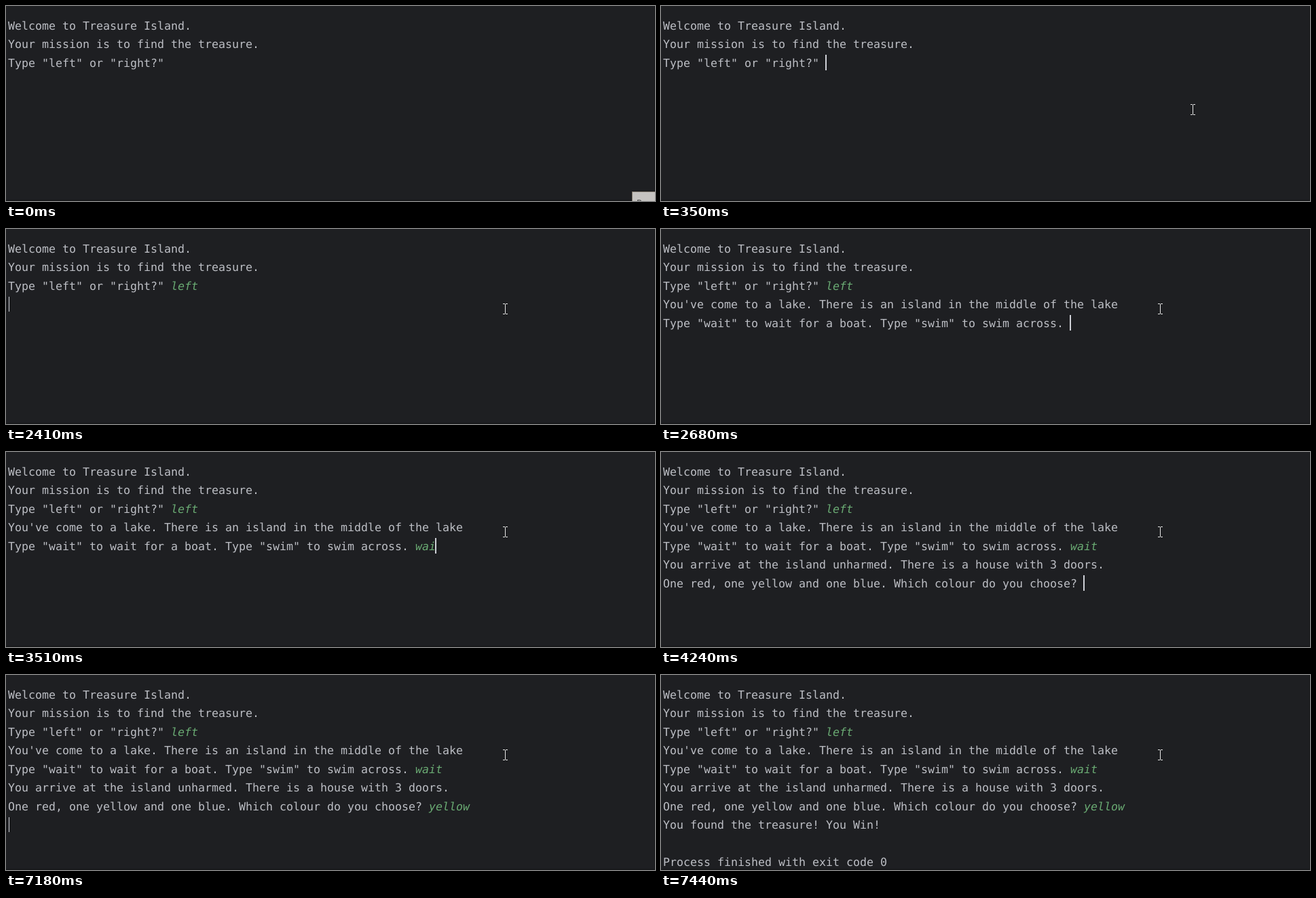
An HTML page for the animation above (8000 ms loop, 956 px wide and 288 px high).

```html
<!DOCTYPE html>
<html lang="en">
<head>
<meta charset="utf-8">
<title>Console game</title>
<style>
  html, body { margin: 0; width: 100%; height: 100%; overflow: hidden; background: #1e1f22; }
  svg { display: block; width: 956px; height: 288px; }
  text {
    font: 16.61px "DejaVu Sans Mono", "Noto Sans Mono", monospace;
    fill: #bcbec4;
    text-rendering: geometricPrecision;
    white-space: pre;
  }
  .typed { font-style: italic; fill: #6aab73; }
  #tip text { font: 12px Inter, sans-serif; fill: #3c3c3c; }
</style>
</head>
<body>
<svg viewBox="0 0 956 288" shape-rendering="crispEdges">
  <rect width="956" height="288" fill="#1e1f22"/>
  <g id="console"></g>
  <rect id="caret" width="2" fill="#ced0d6"/>
  <rect x="955" width="1" height="288" fill="#18191b"/>
  <rect y="286" width="956" height="2" fill="#18191b"/>
  <g id="tip">
    <rect x="922" y="274" width="34" height="14" fill="#8b8378"/>
    <rect x="923" y="275" width="33" height="13" fill="#c5c3c1"/>
    <text x="929" y="295">Run</text>
  </g>
  <path id="mouse" fill="none" stroke="#e8e8e8" d="M-3 -7.5H0M1 -7.5H4M.5 -7V7M-3 7.5H0M1 7.5H4"/>
</svg>
<script>
const LOOP = 8000, LEFT = 3, CELL = 10, PITCH = 27.5;
const $ = id => document.getElementById(id);

// [row, time shown, text]
const lines = [
  [0, 0, 'Welcome to Treasure Island.'],
  [1, 0, 'Your mission is to find the treasure.'],
  [2, 0, 'Type "left" or "right?"'],
  [3, 2680, "You've come to a lake. There is an island in the middle of the lake"],
  [4, 2680, 'Type "wait" to wait for a boat. Type "swim" to swim across.'],
  [5, 4240, 'You arrive at the island unharmed. There is a house with 3 doors.'],
  [6, 4240, 'One red, one yellow and one blue. Which colour do you choose?'],
  [7, 7440, 'You found the treasure! You Win!'],
  [9, 7440, 'Process finished with exit code 0']
];

// ready: caret shown, keys: key times, enter: new line, reply: next output
const answers = [
  { row: 2, col: 24, word: 'left', ready: 70, keys: [1270, 1470, 1670, 1870], enter: 2410, reply: 2680 },
  { row: 4, col: 60, word: 'wait', ready: 2680, keys: [3110, 3310, 3510, 3780], enter: 4040, reply: 4240 },
  { row: 6, col: 62, word: 'yellow', ready: 4240, keys: [5370, 5570, 6080, 6180, 6450, 6580], enter: 7180, reply: 7440 }
];
const blinkOff = [5040, 5370];

function addText(row, col, str, cls = '') {
  const el = document.createElementNS('http://www.w3.org/2000/svg', 'text');
  el.setAttribute('x', LEFT + col * CELL);
  el.setAttribute('y', Math.floor(35 + row * PITCH));
  el.setAttribute('class', cls);
  el.textContent = str;
  $('console').append(el);
  return el;
}

const show = (el, on) => el.setAttribute('visibility', on ? 'visible' : 'hidden');

function placeCaret(row, col) {
  const top = 17 + row * PITCH, half = top % 1;
  const caret = $('caret');
  caret.setAttribute('x', col ? LEFT - 1 + col * CELL : 4);
  caret.setAttribute('width', col ? 2 : 1);
  caret.setAttribute('y', Math.ceil(top));
  caret.setAttribute('height', half ? 22 : 23);
}

function placeMouse(t) {
  const step = Math.min(6, Math.floor((t - 70) / 80));
  const left = (1 - step / 6) ** 2;
  const x = Math.round(735 + 190 * left), y = Math.round(118 + 140 * left);
  $('mouse').setAttribute('transform', `translate(${x} ${y})`);
  show($('mouse'), t >= 70);
}

const output = lines.map(([row, at, str]) => ({ at, el: addText(row, 0, str) }));
for (const a of answers) a.el = addText(a.row, a.col, '', 'typed');

function draw(t) {
  for (const { at, el } of output) show(el, t >= at);
  let caretOn = false;
  for (const a of answers) {
    const n = a.keys.filter(k => t >= k).length;
    a.el.textContent = a.word.slice(0, n);
    if (t < a.ready || t >= a.reply) continue;
    caretOn = t < blinkOff[0] || t >= blinkOff[1];
    if (t < a.enter) placeCaret(a.row, a.col + n);
    else placeCaret(a.row + 1, 0);
  }
  show($('caret'), caretOn);
  show($('tip'), t < 70);
  placeMouse(t);
}

const start = performance.now();
function frame() {
  draw((performance.now() - start) % LOOP);
  requestAnimationFrame(frame);
}
draw(0);
requestAnimationFrame(frame);
</script>
</body>
</html>
```
